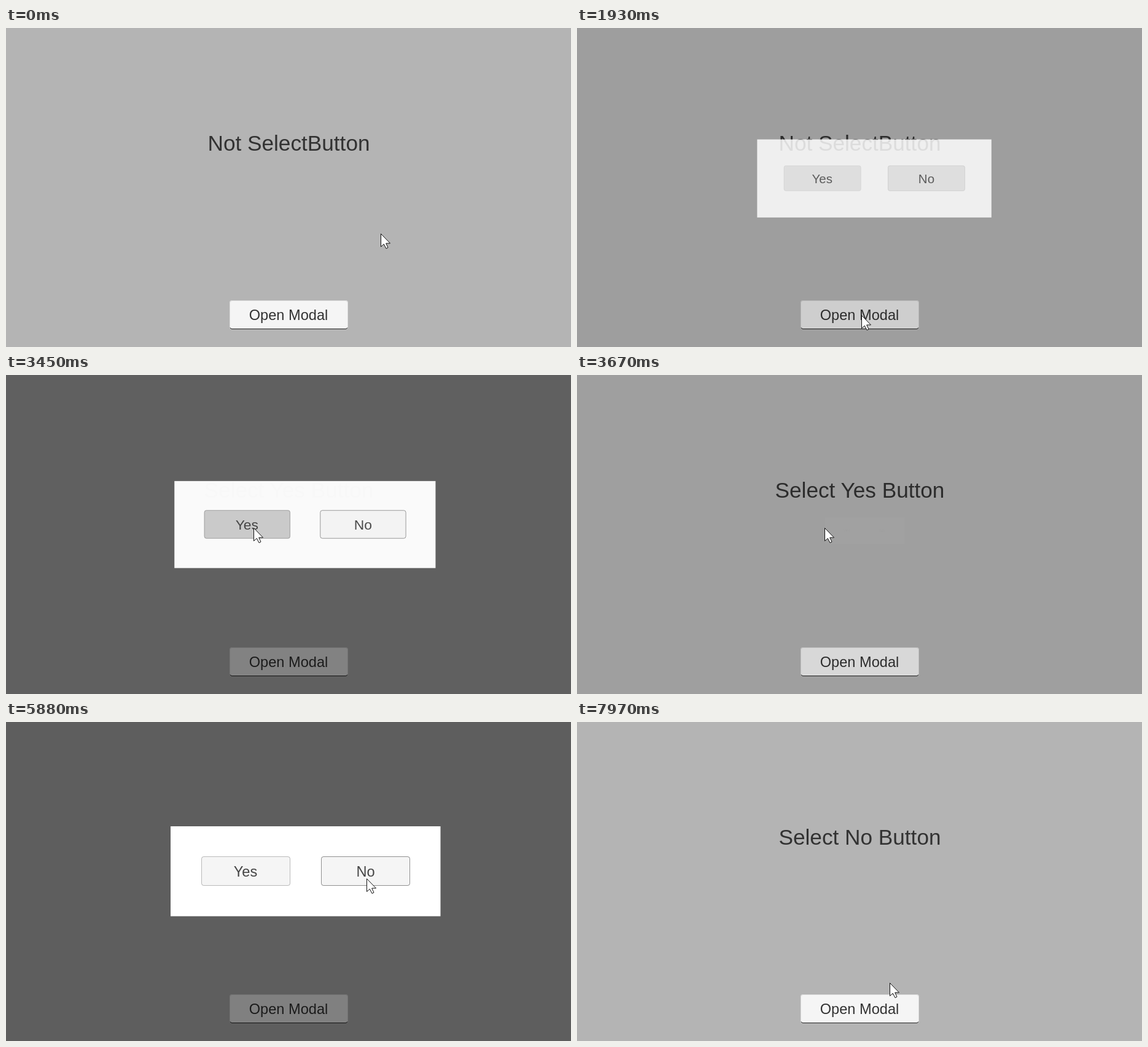
An HTML page that plays this animation: 920 px wide and 520 px high, repeating every 8 s.

```html
<!DOCTYPE html>
<html lang="en">
<head>
<meta charset="utf-8">
<title>Modal dialog</title>
<style>
  html, body { margin: 0; width: 100%; height: 100%; overflow: hidden; background: #b4b4b4; }
  svg { display: block; width: 920px; height: 520px; }
  text { font: 23.6px "Liberation Sans", Arial, sans-serif; fill: #323232; text-anchor: middle; }
  #title { font-size: 35.2px; }
  .edge { fill: none; stroke: #222; }
</style>
</head>
<body>
<svg viewBox="0 0 920 520">
  <rect width="920" height="520" fill="#b4b4b4"/>
  <text id="title" x="460.5" y="200"></text>
  <rect id="open" x="364" y="444" width="193" height="47" rx="4"/>
  <rect class="edge" x="364.5" y="444.5" width="192" height="46" rx="3.5" stroke-opacity=".12"/>
  <path class="edge" d="M365 488.5q.6 2 3 2h185q2.4 0 3-2"/>
  <text x="460" y="476">Open Modal</text>
  <rect id="shade" width="920" height="520"/>
  <g id="modal">
    <rect id="panel" x="268" y="170" width="439.5" height="146.6" fill="#fff"/>
    <g id="yes">
      <rect class="face" x="318" y="219" width="145" height="48" rx="4"/>
      <rect class="edge" x="318.5" y="219.5" width="144" height="47" rx="3.5" stroke-opacity=".28"/>
    </g>
    <g id="no">
      <rect class="face" x="513" y="219" width="145" height="48" rx="4"/>
      <rect class="edge" x="513.5" y="219.5" width="144" height="47" rx="3.5" stroke-opacity=".48"/>
    </g>
    <g id="labels">
      <text x="390" y="252">Yes</text>
      <text x="585.5" y="252">No</text>
    </g>
  </g>
  <path id="cursor" d="M.5.5V21.5L5.300 17.300L9 24.5L12 23L8.700 16H15.5Z" fill="#fff" stroke="#111" stroke-linejoin="round"/>
</svg>
<script>
const LOOP = 8000, TWEEN = 300, FADE = 100;
const el = id => document.getElementById(id);
const clamp = v => Math.max(0, Math.min(1, v));
const mix = (a, b, k) => a + (b - a) * k;
const ramp = (t, start, length) => clamp((t - start) / length);
const smooth = k => k * k * (3 - 2 * k);
const bend = (a, b, c, k) => mix(mix(a, b, k), mix(b, c, k), k);
const grey = v => `rgb(${v},${v},${v})`;

const rounds = [
  { press: 1590, open: 1853, close: 3446, button: "yes" },
  { press: 5040, open: 5222, close: 6837, button: "no" }
];

// Each sweep bends from the last resting place past "via" to "to".
const home = [610, 335];
const sweeps = [
  { start: 30, end: 880, via: [550, 312], to: [463, 453] },
  { start: 880, end: 1340, via: [437, 480], to: [463, 468] },
  { start: 2387, end: 3260, via: [315, 180], to: [403, 249] },
  { start: 3870, end: 4730, via: [420, 310], to: [479, 471] },
  { start: 5437, end: 6230, via: [620, 188], to: [593, 244] },
  { start: 7440, end: 7970, via: [570, 310], to: [509, 425] }
];

function pointer(t) {
  let at = home;
  for (const s of sweeps) {
    if (t < s.start) break;
    const k = smooth(ramp(t, s.start, s.end - s.start));
    at = at.map((v, i) => bend(v, s.via[i], s.to[i], k));
  }
  return at.map(Math.round);
}

function modalState(t, r) {
  if (t < r.close) {
    const k = ramp(t, r.open, TWEEN);
    const e = k < 1 ? 1 - 2 ** (-10 * k) : 1;
    return { shade: k, alpha: k ? e : 0, scale: 0.2 + 0.8 * e, enabled: ramp(t, r.open + TWEEN, FADE) };
  }
  const k = ramp(t, r.close, TWEEN);
  return {
    shade: 1 - k,
    alpha: clamp(1 - 1.2 * k) ** 1.6,
    scale: 0.28 + 0.72 * (1 - k) ** 2.75,
    enabled: 1 - ramp(t, r.close, FADE)
  };
}

function draw(t) {
  const r = rounds[t < 4500 ? 0 : 1];
  const m = modalState(t, r);

  el("title").textContent = t < rounds[0].close ? "Not SelectButton"
    : t < rounds[1].close ? "Select Yes Button" : "Select No Button";

  const held = ramp(t, r.press, FADE) - ramp(t, r.open, FADE);
  el("open").setAttribute("fill", grey(mix(245, 200, held)));
  el("shade").setAttribute("opacity", 0.478 * m.shade);

  el("modal").setAttribute("transform", `translate(460 258) scale(${m.scale}) translate(-460 -258)`);
  el("modal").setAttribute("visibility", m.alpha > 0 ? "visible" : "hidden");
  el("panel").setAttribute("opacity", m.alpha);
  el("labels").setAttribute("opacity", 0.9 * m.alpha);
  for (const id of ["yes", "no"]) {
    const pressed = id === r.button ? ramp(t, r.close - FADE, FADE) : 0;
    const button = el(id);
    button.setAttribute("opacity", m.alpha * mix(0.5, 1, m.enabled));
    button.querySelector(".face").setAttribute("fill", grey(mix(200, mix(245, 200, pressed), m.enabled)));
    button.querySelector(".edge").style.opacity = mix(0.5, 1, m.enabled);
  }

  el("cursor").setAttribute("transform", `translate(${pointer(t)})`);
}

const start = performance.now();
function tick() {
  draw((performance.now() - start) % LOOP);
  requestAnimationFrame(tick);
}
tick();
</script>
</body>
</html>
```
